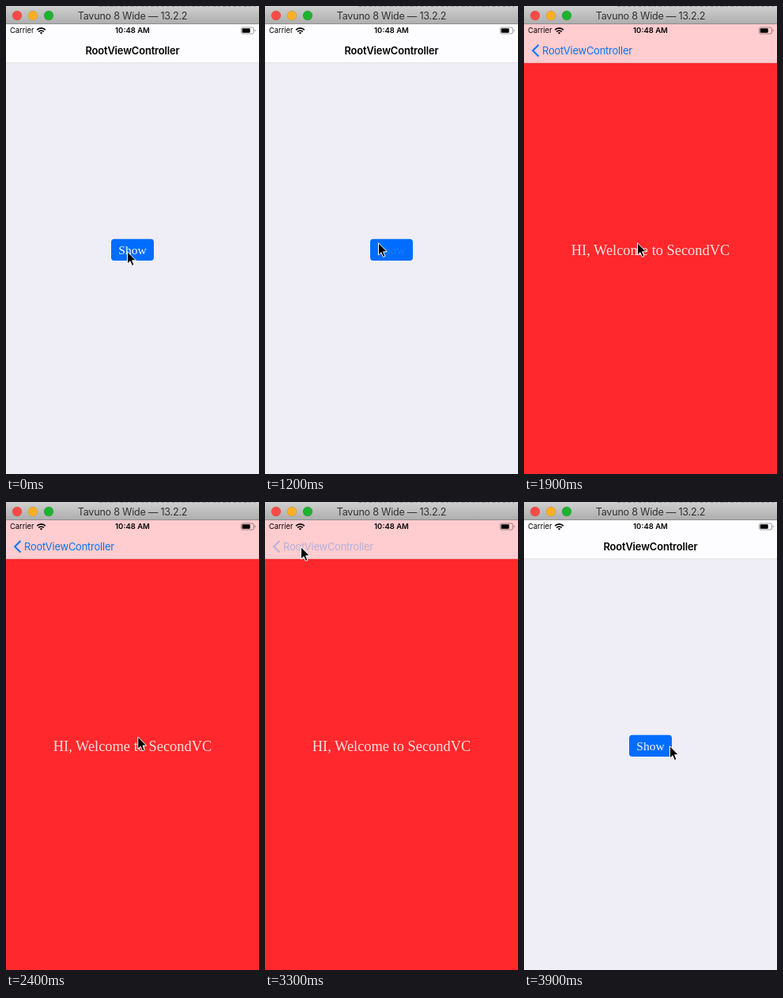
An HTML page for the animation above (4000 ms loop, 320x590 px).

```html
<!DOCTYPE html>
<html lang="en">
<head>
<meta charset="utf-8">
<title>Push and pop</title>
<style>
html, body { margin: 0; width: 100%; height: 100%; overflow: hidden; background: #efedf5; }
svg { display: block; width: 320px; height: 590px; }
text { font-family: Inter, Roboto, sans-serif; white-space: pre; }
.serif { font-family: "Liberation Serif", "Times New Roman", serif; text-anchor: middle; }
.bar { font-size: 12.6px; letter-spacing: -.25px; text-anchor: middle; fill: #333; }
.status { font-size: 9.3px; }
.clock { font-size: 9.5px; font-weight: 600; text-anchor: middle; }
.nav { font-size: 12.9px; }
.title { font-weight: 600; letter-spacing: -.13px; text-anchor: middle; }
.back { letter-spacing: -.2px; fill: #0a74f0; }
</style>
</head>
<body>
<svg viewBox="0 0 320 590">
  <defs>
    <linearGradient id="chrome" x2="0" y2="1">
      <stop stop-color="#cfcfcf"/><stop offset="1" stop-color="#aeaeae"/>
    </linearGradient>
    <linearGradient id="tint" gradientUnits="userSpaceOnUse" x1="0" x2="1">
      <stop stop-color="#ffcccf" stop-opacity="0"/><stop offset="1" stop-color="#ffcccf"/>
    </linearGradient>
  </defs>

  <rect width="320" height="590" fill="#efedf5"/>
  <g id="root">
    <rect x="133" y="293.7" width="54" height="27.4" rx="4" fill="#006dff"/>
    <text id="show" class="serif" x="160" y="313" font-size="15.5" fill="#f4f8ff">Show</text>
  </g>
  <rect id="dim" width="320" height="590"/>
  <g id="second">
    <rect width="320" height="590" fill="#ff282c"/>
    <text class="serif" x="160" y="314" font-size="18.4" fill="#ffe0dd">HI, Welcome to SecondVC</text>
  </g>

  <rect y="22" width="320" height="50" fill="#fdfcfe"/>
  <rect id="wash" y="22" width="320" height="50" fill="url(#tint)"/>
  <rect y="71.4" width="320" height=".6" fill="#000" opacity=".18"/>
  <text id="title" class="nav title" x="160" y="60.5">RootViewController</text>
  <text id="back" class="nav back" x="23" y="60.5">RootViewController</text>
  <path id="chevron" d="M18.4 49 11.2 56.2l7.2 7.2" fill="none" stroke="#0a78fa" stroke-width="2.1"/>

  <text class="status" x="5" y="34">Carrier</text>
  <g fill="none" stroke="#000" stroke-width="1.7">
    <path d="M39.2 30.2a7.2 7.2 0 0 1 10.6 0M41.2 32.4a4.6 4.6 0 0 1 6.6 0"/>
    <path d="M44.5 35.6l-1.7-1.8a2.4 2.4 0 0 1 3.4 0z" fill="#000" stroke="none"/>
  </g>
  <text class="clock" x="160" y="34">10:48 AM</text>
  <rect x="297.5" y="27" width="16" height="8" rx="2" fill="none" stroke="#000" stroke-opacity=".45" stroke-width=".8"/>
  <rect x="298.7" y="28.2" width="10" height="5.6" rx="1" fill="#000"/>
  <path d="M314.8 29.6v2.8q1-.4 1-1.4t-1-1.4" fill="#000" opacity=".45"/>

  <rect width="320" height="22" fill="url(#chrome)"/>
  <path d="M118 .5H316" stroke="#777" stroke-dasharray="5 2 3 3" opacity=".5"/>
  <rect y="22" width="320" height="1" fill="#8f8f8f"/>
  <g stroke="#000" stroke-opacity=".15" stroke-width=".6">
    <circle cx="14" cy="12" r="6" fill="#fc4a47"/>
    <circle cx="34" cy="12" r="6" fill="#fdaf24"/>
    <circle cx="54" cy="12" r="6" fill="#1db230"/>
  </g>
  <text class="bar" x="160" y="17">Tavuno 8 Wide — 13.2.2</text>

  <path id="cursor" d="M.5.7V16L4 12.8 6.4 18.5 9 17.4 6.6 11.8H11.4Z" stroke="#fff" stroke-width="1" stroke-linejoin="round"/>
</svg>
<script>
const LOOP = 4000, STEP = 100, WIDTH = 320;
const PUSH = 1327, POP = 3307;
const el = id => document.getElementById(id);
const [root, show, dim, second, tint, wash, title, back, chevron, cursor] =
  ['root', 'show', 'dim', 'second', 'tint', 'wash', 'title', 'back', 'chevron', 'cursor'].map(el);

// Pointer stops: time, x, y
const trail = [
  [0, 153, 309], [600, 150, 292], [900, 143, 298], [2000, 143, 298], [2500, 169, 295],
  [2900, 34, 67], [3200, 45, 56], [3700, 45, 56], [3900, 184, 307], [4000, 153, 309]
];

function pointer(t) {
  const i = trail.findIndex(p => p[0] > t);
  const [t0, x0, y0] = trail[i - 1], [t1, x1, y1] = trail[i];
  const k = (t - t0) / (t1 - t0), e = k * k * (3 - 2 * k);
  return [x0 + (x1 - x0) * e, y0 + (y1 - y0) * e];
}

// Critically damped spring from 0 to 1
function spring(ms) {
  const u = Math.max(0, ms) * 0.02;
  return 1 - (1 + u) * Math.exp(-u);
}

const move = (node, x, y = 0) => node.setAttribute('transform', `translate(${x} ${y})`);
const fade = (node, a) => node.setAttribute('opacity', a);

function draw(t) {
  let p = t < POP ? spring(t - PUSH) : 1 - spring(t - POP);
  if (p > 0.997) p = 1;
  if (p < 0.003) p = 0;
  const edge = Math.round(WIDTH * (1 - p));
  const pressed = t >= 3200 && t < POP;

  move(root, Math.round(-96 * p));
  fade(show, t >= 1100 && t < 1400 ? 0.1 : 1);
  fade(dim, 0.1 * p);
  move(second, edge);

  const soft = Math.min(35, edge);
  tint.setAttribute('x1', edge - soft);
  tint.setAttribute('x2', edge + soft + 0.01);
  fade(wash, p ? 1 : 0);

  move(title, -77 * p);
  fade(title, 1 - p);
  move(back, 77 * (1 - p));
  fade(back, pressed ? 0.3 : p);
  fade(chevron, pressed ? 0.3 : p);
  move(cursor, ...pointer(t));
}

const start = performance.now();
function tick() {
  const t = (performance.now() - start) % LOOP;
  draw(Math.floor(t / STEP) * STEP);
  requestAnimationFrame(tick);
}
tick();
</script>
</body>
</html>
```
